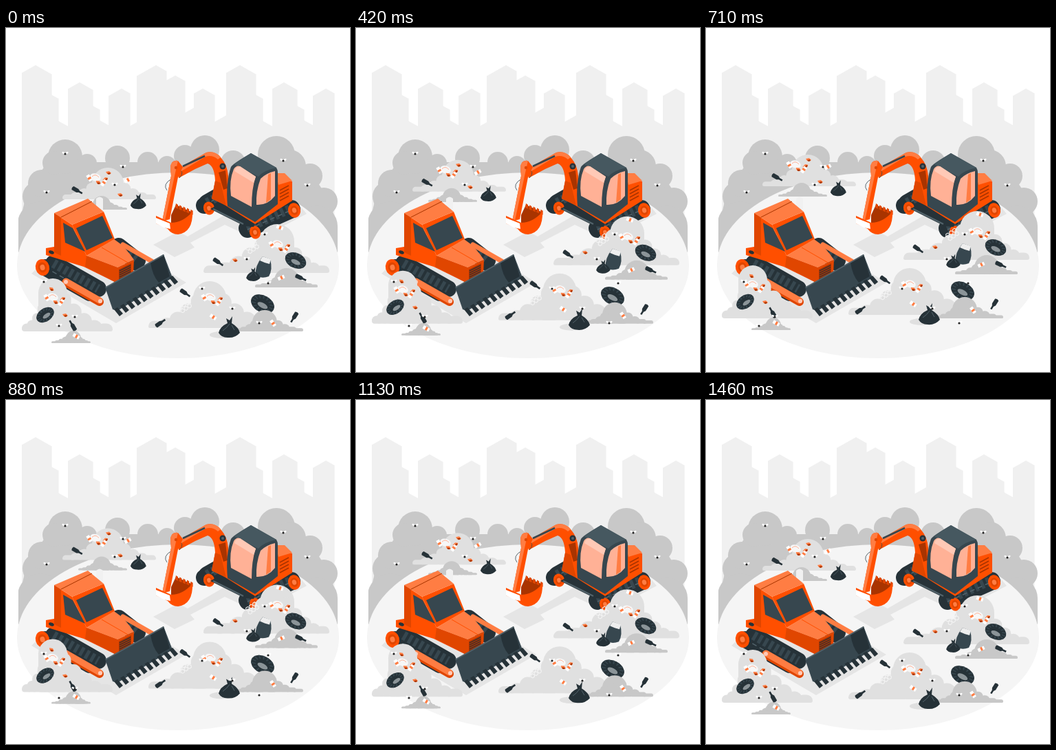
Animation of 500 by 500 pixels, one loop 1500 ms. Source, as an HTML page with a canvas:

```html
<!DOCTYPE html>
<html lang="en">
<head>
<meta charset="utf-8">
<title>Landfill machines</title>
<style>
html, body { margin: 0; width: 100%; height: 100%; overflow: hidden; background: #fff; }
canvas { display: block; width: 500px; height: 500px; }
</style>
</head>
<body>
<canvas id="stage" width="500" height="500"></canvas>
<script>
const ctx = document.getElementById('stage').getContext('2d');
const LOOP = 1500, LIFT = 20;
const ROOF_SLOPE = 0.56, SKYLINE_REPEAT = 297;
const C = {
  city: '#f0f0f0', ground: '#f5f5f5', heap: '#c8c8c8', pile: '#e0e0e0', shade: '#e5e5e5',
  orange: '#ff4f00', light: '#ff7d43', deep: '#e04600', rust: '#a93400',
  dark: '#37474f', black: '#263238', steel: '#53636b', glass: '#ffb196', shine: '#ffc9b6'
};
const mix = (a, b, t) => a + (b - a) * t;

const fill = (color, d) => { ctx.fillStyle = color; ctx.fill(new Path2D(d)); };

function line(color, width, d, cap = 'butt', dash = []) {
  ctx.strokeStyle = color;
  ctx.lineWidth = width;
  ctx.lineCap = cap;
  ctx.setLineDash(dash);
  ctx.stroke(new Path2D(d));
}

function oval(color, x, y, rx, ry = rx, turn = 0) {
  ctx.fillStyle = color;
  ctx.beginPath();
  ctx.ellipse(x, y, rx, ry, turn, 0, Math.PI * 2);
  ctx.fill();
}

function at(x, y, degrees, draw) {
  ctx.save();
  ctx.translate(x, y);
  ctx.rotate(degrees * Math.PI / 180);
  draw();
  ctx.restore();
}

// Scenery

// A run of towers; each begins where the previous one ends.
function towers(x, run) {
  for (const [end, peakX, peakY] of run) {
    const left = peakY + ROOF_SLOPE * (peakX - x);
    const right = peakY + ROOF_SLOPE * (end - peakX);
    fill(C.city, `M${x} 320V${left}L${peakX} ${peakY} ${end} ${right}h.6V320Z`);
    x = end;
  }
}

function skyline() {
  const block = [[66, 43, 54], [76, 66, 97], [90, 76, 135], [126, 107, 79],
    [136, 126, 113], [149, 136, 134], [180, 168, 88]];
  towers(23, block);
  towers(180, [[190, 190, 137], [233, 218, 54], [260, 246, 69],
    [273, 273, 116], [303, 286, 88], [320, 320, 127]]);
  at(SKYLINE_REPEAT, 0, 0, () => towers(23, block));
}

function backHeap() {
  ctx.save();
  ctx.beginPath();
  ctx.rect(18, 150, 464, 176);
  ctx.clip();
  fill(C.heap, 'M18 326V290L30 240 60 195 130 195 350 195 440 205 470 250 482 290V326Z');
  const domes = [[46, 245, 22], [52, 226, 20], [86, 187, 25], [70, 196, 17], [118, 197, 14],
    [162, 189, 18], [206, 195, 15], [234, 199, 13], [260, 186, 16], [289, 177, 21],
    [330, 196, 18], [393, 184, 27], [412, 201, 24], [442, 215, 18], [462, 252, 20], [50, 285, 33], [452, 288, 30]];
  for (const dome of domes) oval(C.heap, ...dome);
  ctx.restore();
}

function backdrop() {
  ctx.fillStyle = '#fff';
  ctx.fillRect(0, 0, 500, 500);
  skyline();
  backHeap();
  oval(C.ground, 250, 345, 234, 135);
  fill(C.shade, 'M214 315L250 296 264 303 345 256H425L437 270 365 308 318 286 268 312 274 319 245 333Z');
  fill(C.shade, 'M37 357L62 333 210 338 262 370 160 429Z');
}

// Machines

// Crawler belt: outer side, then the ribbed top shifted by the belt's depth.
function track(x0, y0, x1, y1, width, depthX, depthY) {
  const belt = `M${x0} ${y0}L${x1} ${y1}`;
  line(C.black, width, belt, 'round');
  at(depthX, depthY, 0, () => {
    line(C.black, width, belt, 'round');
    line(C.dark, width * 0.55, belt, 'butt', [5, 4]);
  });
  line(C.steel, 1.5, belt, 'butt', [7, 5]);
}

function wheel(x, y, r) {
  oval(C.orange, x, y, r, r * 1.2, -0.25);
  oval(C.deep, x, y, r * 0.62, r * 0.75, -0.25);
  oval(C.light, x, y, r * 0.35, r * 0.42, -0.25);
}

function bulldozer() {
  fill('#f1f1f1', 'M131 264V248Q136 243 141 248V264Z');
  track(162, 320, 190, 342, 22, 2, -4);
  line(C.light, 7, 'M170 315L212 339', 'round');
  track(57, 348, 122, 385, 24, 12, -6);
  wheel(53, 348, 10);
  // cab
  fill(C.orange, 'M70 269L96 286 117 331 162 348V371L113 347 58 330V320L70 318Z');
  fill(C.deep, 'M70 269L80 275V331L70 326Z');
  fill(C.orange, 'M96 286L142 267 158 307 117 331Z');
  fill(C.light, 'M70 269L119 248 142 267 96 286Z');
  line(C.rust, 1, 'M80 275L125 252');
  fill(C.dark, 'M83 283L97 291 115 325 86 312Z');
  fill(C.dark, 'M102 291L140 273 155 305 117 323Z');
  oval(C.black, 66, 326, 4, 2.4, 0.4);
  // hood
  fill(C.light, 'M117 331L157 307Q173 317 186 337L162 348Z');
  line(C.orange, 1, 'M139 319L177 341');
  fill(C.deep, 'M117 331L162 348 186 337 185 359 162 371 115 347Z');
  fill(C.rust, 'M164 351L182 342V357L164 367Z');
  for (let y = 353; y < 366; y += 3) line(C.black, 1.2, `M165 ${y}l16 -8`);
  // lifting arm
  line(C.deep, 12, 'M87 370L136 398', 'round');
  line(C.light, 9, 'M87 368L136 396', 'round');
  for (const [x, y] of [[87, 369], [137, 397]]) oval(C.shine, x, y, 3);
  // blade
  fill(C.dark, 'M144 377L229 329 242 363 162 411 155 409Z');
  fill(C.black, 'M210 341L229 329 238 361 222 370Q213 360 210 341Z');
  line(C.steel, 1.5, 'M145 377L229 330');
  for (let i = 0; i < 10; i++) {
    fill(C.black, `M${157 + i * 8.9} ${409 - i * 5.1}l5 -3 8 9 -5 4Z`);
  }
}

function boom() {
  fill(C.orange, 'M248 207L270 193 291 181Q304 178 312 188 322 199 323 215L324 260 299 248 304 222Q303 200 293 197L275 205 251 218Z');
  fill(C.light, 'M248 207L291 181Q304 178 312 188L308 191Q300 184 290 187L250 211Z');
  fill(C.deep, 'M304 222L312 225 320 258 299 248Z');
  fill(C.rust, 'M309 210L319 207 322 233 316 235Z');
  line(C.dark, 2.5, 'M257 201L289 186');
  oval(C.black, 315, 201, 4.5);
  oval(C.steel, 315, 201, 2);
}

function bucketArm() {
  line(C.dark, 0.8, 'M247 204Q262 208 252 218M241 219Q227 227 234 236');
  fill(C.orange, 'M239 203Q240 191 250 193L257 202 250 217 238 278 227 281 240 215Z');
  fill(C.light, 'M239 203Q240 191 250 193L247 206 231 280 227 281 240 215Z');
  oval(C.deep, 247, 203, 2.2);
  fill(C.rust, 'M240 272L247 257 271 268 268 282 240 288Z');
  for (let i = 0; i < 5; i++) fill(C.deep, `M${246 + i * 5.4} ${261 + i * 2.2}l1 -6 3 2v6Z`);
  fill(C.orange, 'M218 273L240 283Q257 283 271 267 272 297 250 300 241 300 235 292L218 284Z');
  fill('#fff', 'M218 276L238 284 239 292 229 290 218 284Z');
}

function cab() {
  fill(C.dark, 'M327 202Q330 197 356 182L393 203Q395 206 395 211V256L362 282 322 259Q319 225 327 202Z');
  fill('#465860', 'M331 198L356 182 393 203Q374 207 367 216Z');
  fill(C.glass, 'M331 205Q335 199 340 201L363 216Q357 233 357 260L327 244Q324 222 331 205Z');
  fill(C.shine, 'M334 203L340 201 363 216 360 225 332 208Z');
  fill(C.glass, 'M370 219Q378 211 391 208V244Q380 258 364 257 363 237 370 219Z');
  fill(C.light, 'M381 213L385 211V249L378 254Z');
}

function excavator() {
  track(288, 258, 302, 250, 24, 4, -4);
  wheel(295, 262, 8);
  track(351, 293, 416, 264, 24, -1, -2);
  wheel(362, 297, 8);
  wheel(419, 265, 9);
  fill(C.black, 'M297 263L320 250 365 276 360 289 347 288Z');
  line(C.steel, 2, 'M301 263L345 285');
  fill(C.orange, 'M316 256L390 215 416 223V251L362 285Z');
  fill(C.light, 'M392 211L405 211 416 222 396 228Z');
  for (let y = 236; y < 252; y += 5) line(C.rust, 1.6, `M398 ${y}l13 -7`);
  boom();
  cab();
  bucketArm();
}

// Rubbish

// A dome at the peak, with lobes sinking along a power curve to both ends.
function mound(color, left, right, base, peakX, peakY, radius) {
  const height = base - peakY, steps = 5;
  const lobe = (x, h, r) => {
    ctx.beginPath();
    ctx.roundRect(x - r, base - h, r * 2, h, [r, r, 4, 4]);
    ctx.fill();
  };
  ctx.fillStyle = color;
  lobe(peakX, height, radius);
  for (const end of [left, right]) {
    const r = Math.max(7, Math.abs(end - peakX) / steps * 0.66);
    const last = end + Math.sign(peakX - end) * r;
    for (let i = 1; i <= steps; i++) {
      const u = i / steps;
      lobe(mix(peakX, last, u), height * (0.15 + 0.85 * (1 - u) ** 1.6), r);
    }
  }
}

const bottle = (x, y, angle) => at(x, y, angle, () =>
  fill(C.black, 'M-9 -1.3H-4L-1 -3H7Q9 0 7 3H-1L-4 1.3H-9Z'));

const can = (x, y, angle) => at(x, y, angle, () => {
  fill('#fff', 'M-5 -2.5H5V2.5H-5Z');
  fill(C.light, 'M-1 -2.5H2V2.5H-1Z');
});

const scrap = (x, y, angle = 0) => at(x, y, angle, () => {
  fill(C.light, 'M-4 -2L1 -3 4 0 1 2 -2 1Z');
  fill(C.rust, 'M-2 0L2 -1 3 1 0 2Z');
});

const bag = (x, y, s = 1) => at(x, y, 0, () => {
  ctx.scale(s, s);
  fill(C.black, 'M-15 8Q-13 -1 -2 -6L-4 -13 1 -10 5 -16 4 -6Q14 0 16 8 9 16 -2 15 -11 15 -15 8Z');
  line(C.steel, 1, 'M1 -5Q-3 1 -9 5M4 -3L8 4');
});

const tire = (x, y, rx, angle) => at(x, y, angle, () => {
  ctx.scale(1, 0.68);
  oval(C.black, 0, 0, rx);
  for (let i = 0; i < 14; i++) at(0, 0, i * 360 / 14, () => line(C.dark, 2, `M${rx * 0.6} 0H${rx}`));
  oval('#8b9498', 1, 3, rx * 0.45, rx * 0.3);
});

const litter = (x, y) => at(x, y, 0, () => {
  oval('#f7f7f7', 0, -1, 8, 5.5, 0.3);
  line(C.glass, 1, 'M-5 -2Q0 -7 5 -1');
  scrap(4, 7, 15);
  scrap(15, 2, -35);
  can(-9, 0, 60);
  can(12, 7, -55);
});

const net = (x, y) => at(x, y, -35, () => {
  for (let i = 0; i < 6; i++) {
    line('#f5f5f5', 1, `M${i % 3 * 6 - 9} ${i < 3 ? -3 : 3}l1.5 -2.5h3l1.5 2.5 -1.5 2.5h-3Z`);
  }
});

function upperPile() {
  mound(C.pile, 82, 218, 249, 148, 203, 23);
  mound(C.heap, 105, 176, 264, 139, 244, 13);
  bottle(103, 236, 210);
  litter(130, 218);
  scrap(149, 211);
  scrap(166, 243);
  can(177, 221, -30);
  bag(192, 252, 0.74);
}

function rightPile() {
  mound(C.pile, 287, 470, 356, 394, 285, 25);
  mound(C.heap, 362, 453, 377, 408, 349, 18);
  net(358, 319);
  litter(395, 315);
  can(398, 290, 20);
  scrap(333, 338);
  bottle(308, 340, 215);
  tire(421, 338, 16, 25);
  fill(C.dark, 'M363 360Q361 346 373 332L384 336Q388 351 382 361 372 365 363 360Z');
  fill('#eee', 'M369 338L373 332 385 336 383 343 376 341Z');
  bag(359, 358, 0.66);
  bottle(428, 363, 205);
  can(400, 363, -25);
}

function centrePile() {
  oval(C.pile, 313, 446, 17, 5);
  mound(C.pile, 207, 400, 436, 296, 368, 24);
  tire(373, 401, 18, 28);
  mound(C.heap, 333, 432, 441, 376, 410, 18);
  net(260, 405);
  litter(297, 392);
  can(301, 420, 35);
  bottle(224, 429, 145);
  bottle(260, 385, 215);
  bottle(419, 420, -58);
  can(388, 429, 55);
  bag(324, 435);
}

function lowerPile() {
  mound(C.pile, 23, 155, 441, 68, 364, 21);
  mound(C.heap, 66, 123, 458, 98, 440, 11);
  scrap(66, 380, 20);
  litter(68, 392);
  scrap(86, 418);
  tire(57, 417, 14, -35);
  bottle(97, 433, 60);
  can(102, 448, 30);
}

function fly([x, y]) {
  for (const side of [-1, 1]) oval('#fff', x + side * 2.5, y - 1.5, 2.2, 1.3, -side * 0.5);
  oval('#222', x, y, 1.6);
}

const flies = [
  [86, 183], [170, 202], [59, 239], [403, 193], [438, 229],
  [158, 228], [376, 300], [350, 336], [381, 371], [285, 379],
  [329, 408], [368, 429], [55, 369], [77, 433], [100, 420]
];

function render(now) {
  const phase = now % LOOP / LOOP;
  const lift = -LIFT * (1 - Math.abs(1 - 2 * phase));
  backdrop();
  at(0, lift, 0, upperPile);
  bulldozer();
  excavator();
  for (const pile of [rightPile, centrePile, lowerPile]) at(0, lift, 0, pile);
  flies.forEach(fly);
}

const start = performance.now();
function tick() {
  render(performance.now() - start);
  requestAnimationFrame(tick);
}
tick();
</script>
</body>
</html>
```
